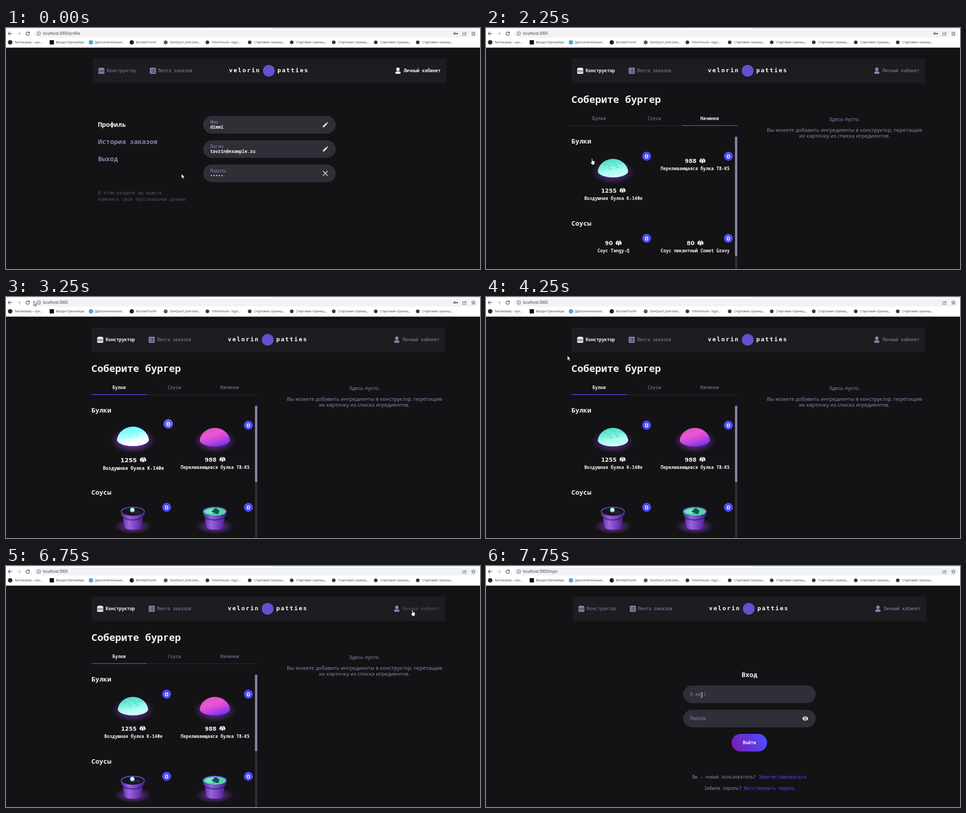
An HTML page with a canvas for the animation above (8 s loop, 1048 px wide and 534 px high).

```html
<!DOCTYPE html>
<html lang="ru">
<head>
<meta charset="utf-8">
<title>Конструктор бургеров</title>
<style>
html, body { margin: 0; width: 100%; height: 100%; overflow: hidden; background: #131316; }
canvas { display: block; width: 1048px; height: 534px; }
</style>
</head>
<body>
<canvas id="stage" width="1048" height="534"></canvas>
<script>
const ctx = document.getElementById('stage').getContext('2d');
const LOOP = 8000, STEP = 250, TAU = Math.PI * 2;
const MONO = '"Noto Sans Mono", "DejaVu Sans Mono", monospace';
const SANS = '"Noto Sans", "Open Sans", sans-serif';
const WIDE = '"DejaVu Sans", sans-serif';
const BASE = '9.75px "DejaVu Sans Mono", monospace';
const STRONG = '600 9.78px ' + MONO;
const HEAD = '700 14.67px ' + MONO;
const TITLE = '600 22px ' + MONO;
const NUM = 'bold 12.4px ' + WIDE;
const BG = '#131316', PANEL = '#1c1c21', FIELD = '#2f2f37';
const MUTED = '#8585ad', DIM = '#525269', WHITE = '#f2f2f3', ACCENT = '#4c4cff';

// step, shape, x, y of each pointer stop
const pointer = [
  [0, 'arrow', 388, 323], [1, 'arrow', 322, 290], [2, 'arrow', 228, 242],
  [3, 'arrow', 152, 227], [4, 'arrow', 131, 236], [6, 'arrow', 237, 275],
  [7, 'hand', 236, 296], [13, 'arrow', 61, 9], [14, 'arrow', 10, 9],
  [15, 'arrow', 47, 11], [17, 'arrow', 180, 130], [18, 'arrow', 330, 464],
  [19, 'arrow', 200, 240], [20, 'arrow', 90, 60], [21, 'arrow', 52, 13],
  [22, 'arrow', 60, 21], [23, 'arrow', 250, 70], [24, 'arrow', 600, 160],
  [25, 'arrow', 831, 206], [26, 'arrow', 886, 128], [27, 'hand', 900, 104],
  [29, 'arrow', 760, 170], [30, 'arrow', 588, 226], [31, 'beam', 477, 286]
];

function text(str, x, y, color, font, align = 'left', gap = 0) {
  ctx.font = font || (color === WHITE ? STRONG : BASE);
  ctx.textAlign = align;
  ctx.letterSpacing = gap + 'px';
  ctx.fillStyle = color;
  ctx.fillText(str, x, y);
}
function rect(x, y, w, h, color, r = 0) {
  ctx.fillStyle = color;
  ctx.beginPath();
  ctx.roundRect(x, y, w, h, r);
  ctx.fill();
}
function oval(x, y, rx, ry, color) {
  ctx.fillStyle = color;
  ctx.beginPath();
  ctx.ellipse(x, y, rx, ry, 0, 0, TAU);
  ctx.fill();
}
const dot = (x, y, r, color) => oval(x, y, r, r, color);
function line(points, color, width = 1) {
  ctx.strokeStyle = color;
  ctx.lineWidth = width;
  ctx.beginPath();
  points.forEach(([x, y]) => ctx.lineTo(x, y));
  ctx.stroke();
}
function shape(d, x, y, fill, stroke, width = 1) {
  const path = new Path2D(d);
  ctx.save();
  ctx.translate(x, y);
  if (fill) { ctx.fillStyle = fill; ctx.fill(path); }
  if (stroke) { ctx.strokeStyle = stroke; ctx.lineWidth = width; ctx.stroke(path); }
  ctx.restore();
}
function gradient(x0, y0, x1, y1, ...colors) {
  const g = ctx.createLinearGradient(x0, y0, x1, y1);
  colors.forEach((c, i) => g.addColorStop(i / (colors.length - 1), c));
  return g;
}
function cross(x, y, r, color, width) {
  line([[x - r, y - r], [x + r, y + r]], color, width);
  line([[x + r, y - r], [x - r, y + r]], color, width);
}
function glow(x, y, rx, ry) {
  ctx.save();
  ctx.translate(x, y);
  ctx.scale(1, ry / rx);
  const g = ctx.createRadialGradient(0, 0, rx * 0.5, 0, 0, rx);
  g.addColorStop(0, 'rgba(112,48,160,.6)');
  g.addColorStop(1, 'rgba(112,48,160,0)');
  dot(0, 0, rx, g);
  ctx.restore();
}

function browser(url, loading, hasKey) {
  const ink = '#484c50', small = '6.7px ' + SANS;
  rect(0, 0, 1048, 43.6, '#fff');
  rect(0, 0, 435, 1, '#dfe4ea');
  rect(588, 0, 460, 1, '#bcd5ee');
  rect(62, 4, 981, 17, '#f1f3f4', 8.5);
  shape('M4.5 0H-4M0-4L-4 0L0 4', 9, 12.3, null, ink, 1.2);
  shape('M-4.5 0H4M0-4L4 0L0 4', 28.5, 12.3, null, '#b9bcc0', 1.1);
  if (loading) cross(48, 12.3, 3.7, '#b4b7ba', 1.1);
  else {
    shape('M3.2-2A3.8 3.8 0 1 0 3.8 1', 48, 12.3, null, ink, 1.3);
    shape('M4.4-4.6V-.6H.4Z', 48, 12.3, ink);
  }
  shape('M4 0A4 4 0 1 1-4 0A4 4 0 1 1 4 0M0-.6V2.4M0-2.3V-1.2', 72.5, 12.3, null, ink, 0.9);
  text(url, 82, 15.2, '#3c4043', '8.05px ' + SANS);
  if (hasKey) {
    shape('M-.5 0A1.9 1.9 0 1 1-4.3 0A1.9 1.9 0 1 1-.5 0H4.2V2M2.2 0V1.8', 994.3, 12.3, null, ink, 1.4);
  }
  shape('M-1-2H-4V4H3.5V2M-1.5 1.5Q-1-2 2-2.2V-4.2L4.8-1.3L2 1.2V-.4Q0-.5-1.5 1.5Z', 1013.5, 12.5, null, '#6a6e72', 0.9);
  shape('M0-4.3L1.2-1.4L4.3-1.2L1.9.8L2.7 3.8L0 2.1L-2.7 3.8L-1.9.8L-4.3-1.2L-1.2-1.4Z', 1033.3, 12.5, null, ink, 1);

  dot(9.2, 31.8, 5, '#30262a');
  rect(96.5, 27, 9.5, 9.5, '#0c0c0d');
  dot(187.8, 31.8, 5, '#4da7df');
  dot(278, 31.8, 4.8, '#1b1d20');
  dot(353, 31.8, 4.4, '#55595d');
  const marks = [[18.5, 'Тиктакомер – луч...'], [110.5, 'Велдон.Тренажёры'], [197, '[Дополнительные...'],
    [287.5, 'BorislavTrunin'], [362.5, 'DanQuorl_Exercises...'], [455, 'Tolverhouse ‹ Курс...']];
  for (let i = 0; i < 5; i++) marks.push([548.5 + i * 92.9, 'Стартовая страниц...']);
  marks.forEach(([x, label], i) => {
    if (i > 4) dot(x - 9.7, 31.8, 4, '#35373a');
    text(label, x, 34.3, '#45484c', small);
  });
}

function header(dx, active, faded) {
  const build = active === 'build' ? WHITE : MUTED;
  const user = active === 'user' ? WHITE : MUTED;
  ctx.save();
  ctx.translate(dx, 0);
  rect(191.5, 68, 782, 54, PANEL);
  shape('M-7-1.3Q-7-6.7-2.5-6.7H2.5Q7-6.7 7-1.3Z', 210.8, 94.8, build);
  rect(203.6, 94.6, 14.4, 2, build, 1);
  rect(203.8, 97.6, 14, 4, build, [1, 1, 4, 4]);
  text('Конструктор', 223, 98.4, build);
  rect(318, 88, 13.4, 13.6, MUTED, 1.5);
  for (const y of [91, 94.2, 97.4]) {
    rect(320.3, y, 1.6, 1.3, PANEL);
    rect(323.3, y, 5.7, 1.3, PANEL);
  }
  text('Лента заказов', 336, 98.4, MUTED);
  const logo = 'bold 13px "DejaVu Sans Mono", monospace';
  text('velorin', 493, 98.2, '#fff', logo, 'left', 2.1);
  dot(581, 94.8, 13, '#6650cf');
  text('patties', 600, 98.2, '#fff', logo, 'left', 2.1);
  oval(866.6, 91.5, 3.7, 3.9, user);
  rect(860.8, 96.3, 11.6, 5.2, user, [4, 4, 2, 2]);
  text('Личный кабинет', 879, 98.4, faded ? DIM : user);
  ctx.restore();
}

function field(y, label, value) {
  rect(436, y, 293, 39, FIELD, 19.5);
  text(label, 451.5, y + (value ? 17.2 : 22.8), MUTED);
  if (value) text(value, 451.5, y + 28, WHITE);
}
function pencil(y) {
  shape('M-5.7 5.6L-5 2.6L1.7-4.1L4.1-1.7L-2.6 5Z M2.5-4.9L3.6-5.8Q4.3-6 5.8-4.4Q6-3.7 4.9-2.5Z', 706, y, WHITE);
}

function profile(n) {
  header(0, 'user');
  text('Профиль', 203.5, 218.8, WHITE, HEAD);
  text('История заказов', 203.5, 256.8, MUTED, HEAD);
  text('Выход', 203.5, 294.7, n < 7 ? MUTED : n < 8 ? '#67678a' : DIM, HEAD);
  text('В этом разделе вы можете', 203.5, 368.6, DIM);
  text('изменить свои персональные данные', 203.5, 383.3, DIM);
  field(195, 'Имя', 'dimmi');
  field(248.8, 'Логин', 'tavrin@example.ru');
  field(302.6, 'Пароль', ' ');
  pencil(214.5);
  pencil(268.3);
  cross(706, 322, 5.2, WHITE, 1.5);
  for (let i = 0; i < 5; i++) dot(454.4 + i * 5.87, 327, 1.3, WHITE);
}

function login() {
  header(0, '');
  text('Вход', 582.5, 245.6, WHITE, HEAD, 'center');
  field(264.7, 'E-mail');
  field(318.5, 'Пароль');
  oval(706, 338, 6.2, 4.6, WHITE);
  dot(706, 338, 2.9, FIELD);
  dot(706, 338, 1.7, WHITE);
  rect(543, 372, 78.5, 39, gradient(550, 408, 614, 376, '#7a1db8', '#4c4cff'), 19.5);
  text('Войти', 582.3, 395.4, WHITE, STRONG, 'center');
  text('Вы – новый пользователь?', 456, 471.3, MUTED);
  text('Зарегистрироваться', 602.7, 471.3, ACCENT);
  text('Забыли пароль?', 482.5, 495.6, MUTED);
  text('Восстановить пароль', 570.5, 495.6, ACCENT);
}

const DOME = 'M-33.5 6C-31-11-15-21 0-21C15-21 31-11 33.5 6C34 14 18 20 0 20C-18 20-34 14-33.5 6Z';
function bun(x, y, pink) {
  glow(x, y + 8, 47, 27);
  const fill = pink
    ? gradient(-8, -21, 5, 20, '#dd52c4', '#ea55d4', '#c845dc', '#7a35f2')
    : gradient(-4, -21, 4, 20, '#48dcc2', '#74eddb', '#aefcf1', '#d2fffa');
  shape(DOME, x, y, fill);
  const count = pink ? 44 : 8;
  for (let i = 0; i < count; i++) {
    const a = i * 2.4, r = Math.sqrt((i + 0.5) / count);
    const px = x + Math.cos(a) * r * 24, py = y - 7 + Math.sin(a) * r * 9;
    if (pink) dot(px, py, 0.5, 'rgba(255,175,190,.5)');
    else {
      oval(px, py, 3.4, 1.7, 'rgba(52,196,176,.6)');
      oval(px, py + 0.9, 3, 1.1, 'rgba(125,238,222,.9)');
    }
  }
}
function pot(x, y, green) {
  glow(x, y + 42, 42, 17);
  const clay = gradient(-26, 0, 26, 0, '#4a2694', '#9a62e2', '#7440be', '#3c1d78');
  shape('M-22.5 19L-18.5 43Q-17 49.5 0 49.5Q17 49.5 18.5 43L22.5 19Z', x, y, clay);
  shape('M-23 21Q0 32 23 21L22.3 24Q0 35 -22.3 24Z', x, y, 'rgba(28,10,64,.5)');
  shape('M-26.5 9L-25 18.5Q-14 25.5 0 25.5Q14 25.5 25 18.5L26.5 9Z', x, y, clay);
  oval(x, y + 9, 26.5, 10.3, '#7049cc');
  oval(x, y + 9.6, 24.5, 8.8, green ? '#4fd6a6' : '#17131f');
  if (green) {
    oval(x - 9, y + 9, 11, 5, '#72eec2');
    for (const [dx, dy] of [[-4, 9], [4, 8], [0, 5], [3, 12]]) oval(x + 2 + dx, y + dy, 4.2, 2.7, '#174d5c');
    line([[x + 2, y + 8], [x - 2, y + 15]], '#174d5c', 1.4);
  } else {
    oval(x + 9, y + 11, 8, 3.5, '#2a2136');
    dot(x - 1, y + 6, 5.3, '#63dfc0');
    dot(x - 1, y + 5.2, 3.4, '#d5fff1');
  }
}
function coin(x, y) {
  for (const s of [-1, 1]) {
    shape(`M${s * 1.2}-5.8Q${s * 5.8}-5 ${s * 7} 1L${s * 4} 4.4L${s * 2} 1Z`, x, y, WHITE);
    shape(`M${s * 6.4} 2.8L${s * 1.8} 6L${s * 3.8} 4.6Z`, x, y, WHITE);
  }
  shape('M0-6.2Q1.6-2.5 3.2 1.6Q2.2 4.6 0 6Q-2.2 4.6-3.2 1.6Q-1.6-2.5 0-6.2Z', x, y, WHITE, BG, 0.9);
}

function card(cx, y, price, name, picture, hover) {
  ctx.save();
  if (hover) {
    ctx.translate(cx, y + 60);
    ctx.scale(1.05, 1.05);
    ctx.translate(-cx, -y - 60);
    ctx.filter = 'brightness(1.3)';
  }
  if (picture) picture();
  const py = y + (picture ? 76 : 10.5);
  const left = cx - (price.length * 8.63 + 20) / 2;
  text(price, left, py + 4.5, WHITE, NUM);
  coin(left + price.length * 8.63 + 13, py);
  text(name, cx, py + 20.8, WHITE, STRONG, 'center');
  dot(cx + 73.4, y, 9.9, ACCENT);
  text('0', cx + 73.4, y + 4.5, WHITE, NUM, 'center');
  ctx.restore();
}

function home(n) {
  const loaded = n >= 10, tab = n < 11 ? 2 : 0;
  header(-2.5, 'build', n === 27);
  text('Соберите бургер', 188.7, 166, WHITE, TITLE);
  rect(189, 216, 367, 1, FIELD);
  rect(189 + tab * 122.2, 215.5, 122.2, 1.4, ACCENT);
  ['Булки', 'Соусы', 'Начинки'].forEach((label, i) => {
    const on = i === tab;
    text(label, 250 + i * 122.2, 203.5, on ? WHITE : MUTED, on ? STRONG : BASE, 'center');
  });
  text('Булки', 188.7, 255.6, WHITE, HEAD);
  text('Соусы', 188.7, 437.6, WHITE, HEAD);
  card(281.7, 284, '1255', 'Воздушная булка K-140e', () => bun(280.7, 311, false), n >= 11 && n <= 13);
  card(462.5, 284, '988', 'Переливающаяся булка T8-K5', loaded && (() => bun(461.7, 311, true)));
  card(281.7, 466, '90', 'Соус Tangy-Q', loaded && (() => pot(280.3, 466, false)));
  card(462.5, 466, '80', 'Соус пикантный Comet Gravy', loaded && (() => pot(461.5, 466, true)));
  rect(550.5, 241, 5, 293, FIELD);
  rect(550.5, 241, 5, loaded ? 169 : 264, MUTED);
  const hint = '11.35px ' + SANS;
  text('Здесь пусто.', 792.5, 206, MUTED, hint, 'center');
  text('Вы можете добавить ингредиенты в конструктор, перетащив', 792.5, 230.3, MUTED, hint, 'center');
  text('их карточку из списка игредиентов.', 792.5, 242.5, MUTED, hint, 'center');
}

function drawPointer(n) {
  const [, kind, x, y] = pointer.filter(p => p[0] <= n).pop();
  if (kind === 'arrow') {
    shape('M0 0V10.2L2.3 8.1L4 11.8L5.7 11L4.1 7.4H7.1Z', x, y, '#fff', '#17171a', 0.8);
  } else if (kind === 'hand') {
    shape('M-2.5-6Q-1.2-7.2-.5-5.8V-2L3.4-1Q4.8-.5 4.6 1L4 4.5L3 7H-1.5L-4.4 2.5Q-4.8 1-3.4 1L-2.2 2Z', x, y, '#fff', '#17171a', 0.8);
  } else {
    shape('M-2-5H2M0-5V5M-2 5H2', x, y, null, '#d5d5dc', 1);
  }
}

function draw(now) {
  const n = Math.floor(now % LOOP / STEP);
  const page = n < 9 ? 'profile' : n < 28 ? '' : 'login';
  const loading = n === 16 || n === 22;
  rect(0, 0, 1048, 534, BG);
  browser('localhost:3000' + (page && '/' + page), loading, n < 16);
  if (page === 'profile') profile(n);
  else if (page === 'login') login();
  else home(n);
  drawPointer(n);
}

const start = performance.now();
function tick() {
  draw(performance.now() - start);
  requestAnimationFrame(tick);
}
tick();
</script>
</body>
</html>
```
